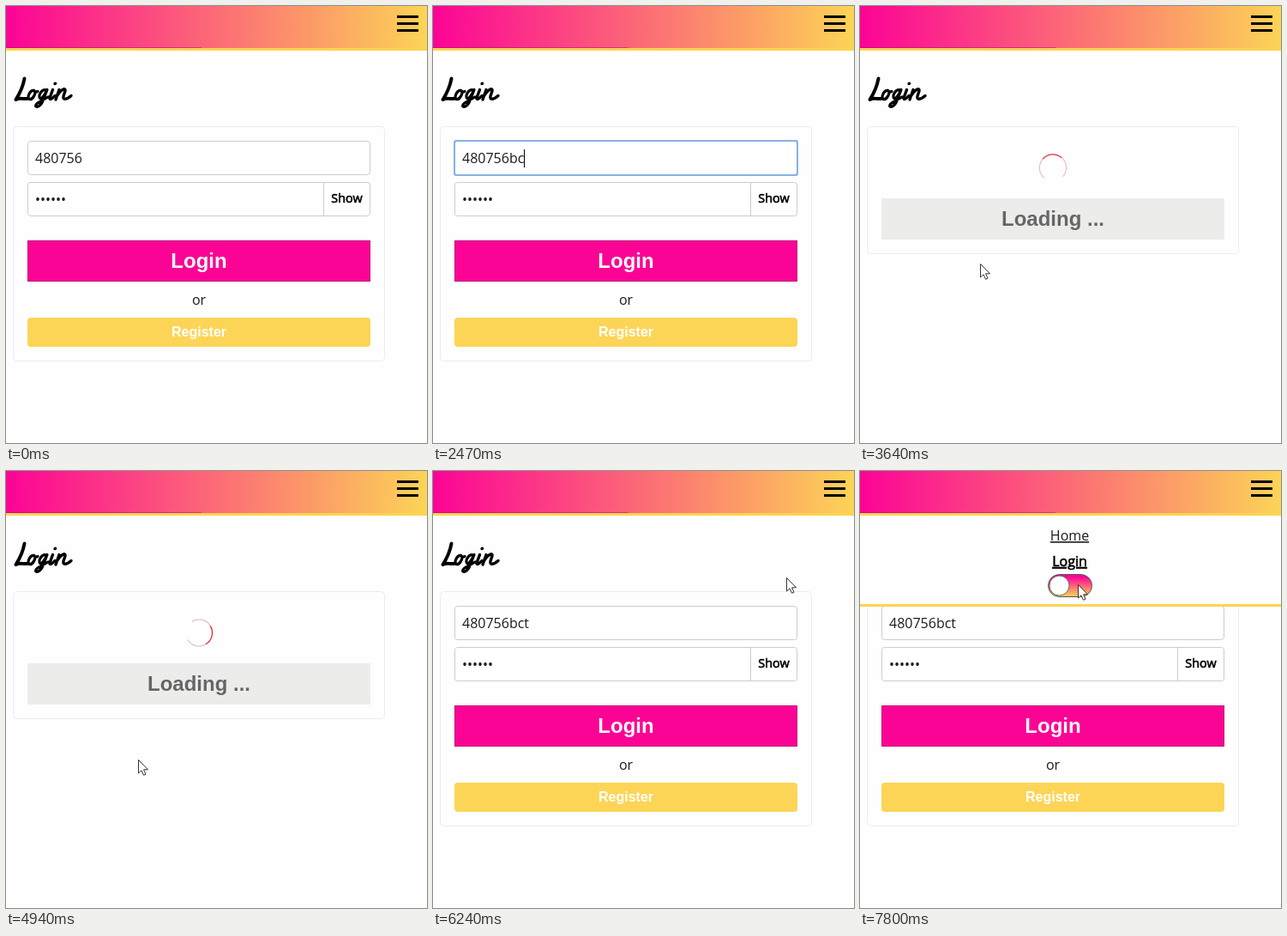
Recreate the animation shown at these times as an HTML page. Size 491 px wide and 509 px high, loop 8 s.

```html
<!DOCTYPE html>
<html lang="en">
<head>
<meta charset="utf-8">
<title>Login form</title>
<style>
  html, body { margin: 0; width: 100%; height: 100%; overflow: hidden; background: #fefefe; }
  svg { display: block; width: 491px; height: 509px; }
  text { font: 16px "Open Sans", sans-serif; fill: #1c1c1c; }
  .mid { text-anchor: middle; }
  .button { font: bold 24px "Liberation Sans", Arial, sans-serif; fill: #fff; }
  .small { font-size: 16px; }
  .heavy { fill: #000; stroke: #000; stroke-width: .6px; }
  .link { text-decoration: underline; }
  .field { fill: #fff; stroke: #ccc; }
  .card { fill: none; stroke: #ececec; }
  .brush { fill: none; stroke: #000; stroke-linecap: round; stroke-linejoin: round; }
</style>
</head>
<body>
<svg viewBox="0 0 491 509">
  <defs>
    <linearGradient id="across">
      <stop offset="0" stop-color="#fc0396"/><stop offset="1" stop-color="#fcd456"/>
    </linearGradient>
    <linearGradient id="down" x2="0" y2="1">
      <stop offset=".1" stop-color="#fc0396"/><stop offset="1" stop-color="#fcd456"/>
    </linearGradient>
    <pattern id="wave" x="34" y="184" width="4" height="4" patternUnits="userSpaceOnUse">
      <path d="M-1 3L0 3L2 1L4 3L5 3" fill="none" stroke="#d8205c"/>
    </pattern>
  </defs>

  <g class="brush" role="img" aria-label="Login">
    <path stroke-width="4" d="M21.5 84.5C20 93 16 102 11.5 109C15 106.5 19 108.5 24.5 108"/>
    <path stroke-width="3.2" d="M33 98.500C28 97 24.500 106 27 108.500C31 110 36.500 100 32.500 98.500Q34 101 37 99.500"/>
    <path stroke-width="3.2" d="M47 98C42 96 37.500 104 39.500 107.500C42 109 46 102 48 97.500L44 108C41.500 116 36 119 34.500 116.500C34 113 43 110 49 106"/>
    <path stroke-width="3.400" d="M54.500 97.500L51 107C50.500 110 54 108 57 104.500M57 90.500l.6 -.3"/>
    <path stroke-width="3.400" d="M62 97.500L58 109M60 104C64 97 70 94.500 69 99L67 105C66 110 71 109 76 104.500"/>
  </g>

  <g id="form">
    <rect class="card" x="8.500" y="140.500" width="433" height="273" rx="4"/>
    <rect class="field" x="25.500" y="157.500" width="399" height="39" rx="3"/>
    <rect id="focus" x="25" y="157" width="400" height="40" rx="2" fill="none" stroke="#86b1e6" stroke-width="2"/>
    <rect id="squiggle" x="34" y="184" width="78" height="4" fill="url(#wave)"/>
    <text id="name" x="34" y="183"></text>
    <rect id="caret" y="167" width="1" height="21"/>
    <rect class="field" x="25.500" y="205.500" width="399" height="39" rx="3"/>
    <path d="M370.500 205V245" stroke="#ccc"/>
    <text x="34" y="231">••••••</text>
    <text class="mid heavy" x="397.500" y="229" style="font-size:14.400px">Show</text>
    <rect x="25.500" y="273.500" width="399" height="47" fill="#fb0394" stroke="#c00878"/>
    <text class="mid button" x="225" y="305">Login</text>
    <text class="mid" x="225" y="348">or</text>
    <rect x="25" y="363" width="400" height="34" rx="4" fill="#fcd557"/>
    <text class="mid button small" x="225" y="385">Register</text>
  </g>

  <g id="loading">
    <rect class="card" x="8.500" y="140.500" width="433" height="148" rx="4"/>
    <g id="spinner" fill="none">
      <path d="M-11 -11A15.500 15.500 0 0 0 -11 11M11 -11A15.500 15.500 0 0 1 11 11" stroke="#e2b4b6"/>
      <path d="M-11 -11A15.500 15.500 0 0 1 11 -11" stroke="#e8283c" stroke-width="1.300"/>
    </g>
    <rect x="25" y="224" width="400" height="48" fill="#ecedeb"/>
    <text class="mid button" x="225" y="256" style="fill:#666">Loading ...</text>
  </g>

  <g id="menu">
    <rect y="52" width="491" height="103" fill="#fefefe"/>
    <rect y="155" width="491" height="3" fill="#fcd353"/>
    <text class="mid link" x="244.500" y="81">Home</text>
    <text class="mid link heavy" x="244.500" y="111">Login</text>
    <rect x="219.500" y="120.500" width="51" height="26" rx="13" fill="url(#down)" stroke="#555"/>
    <circle cx="232.500" cy="133.500" r="11.500" fill="#fff" stroke="#666"/>
  </g>

  <rect width="491" height="49" fill="url(#across)"/>
  <rect y="48" width="228" height="1" fill="#a01478" opacity=".5"/>
  <rect y="49" width="491" height="3" fill="#fcd353"/>
  <path d="M456 12.500h25M456 20.500h25M456 28.500h25" stroke="#000" stroke-width="3"/>

  <path id="pointer" d="M.5 .5V16L4 12.800L6.500 18.300L9 17.200L6.600 11.800H11.500Z" fill="#fff" stroke="#333"/>
</svg>
<script>
  const LOOP = 8000, STEP = 130, LAST = 7800;
  const FOCUS = 1170, SUBMIT = 3380, RETURN = 5200, MENU = 7020, BLINK = 530;
  const START_NAME = "480756";
  const KEYS = [[2210, "b"], [2340, "c"], [2600, "t"]];
  // time, x, y
  const POINTER = [
    [2730, 125, 196], [3120, 140, 300], [4160, 140, 300], [4940, 154, 336],
    [5720, 154, 336], [6240, 412, 124], [6760, 466, 26], [7020, 466, 26],
    [7540, 254, 132]
  ];
  const $ = id => document.getElementById(id);
  const show = (id, on) => { $(id).style.display = on ? "" : "none"; };

  function pointerAt(t) {
    const next = POINTER.findIndex(p => p[0] > t);
    if (next < 0) return POINTER[POINTER.length - 1].slice(1);
    if (next === 0) return POINTER[0].slice(1);
    const [t0, x0, y0] = POINTER[next - 1], [t1, x1, y1] = POINTER[next];
    const k = (t - t0) / (t1 - t0);
    return [x0 + (x1 - x0) * k, y0 + (y1 - y0) * k].map(Math.round);
  }

  function render(t) {
    const typed = KEYS.filter(key => key[0] <= t);
    const lastInput = typed.length ? typed[typed.length - 1][0] : FOCUS;
    const focused = t >= FOCUS && t < SUBMIT;
    const loading = t >= SUBMIT && t < RETURN;

    show("form", !loading);
    show("loading", loading);
    show("menu", t >= MENU);
    show("focus", focused);
    show("squiggle", focused && typed.length === KEYS.length);
    show("caret", focused && Math.floor((t - lastInput) / BLINK) % 2 === 0);
    show("pointer", t >= POINTER[0][0]);

    $("name").textContent = START_NAME + typed.map(key => key[1]).join("");
    if (focused) $("caret").setAttribute("x", Math.round(34 + $("name").getComputedTextLength()));
    $("spinner").setAttribute("transform", `translate(225 188.5) rotate(${(t - SUBMIT) * .36 - 98})`);
    $("pointer").setAttribute("transform", `translate(${pointerAt(t)})`);
  }

  const start = performance.now();
  function tick() {
    const t = (performance.now() - start) % LOOP;
    render(Math.min(LAST, Math.floor(t / STEP) * STEP));
    requestAnimationFrame(tick);
  }
  tick();
</script>
</body>
</html>
```
